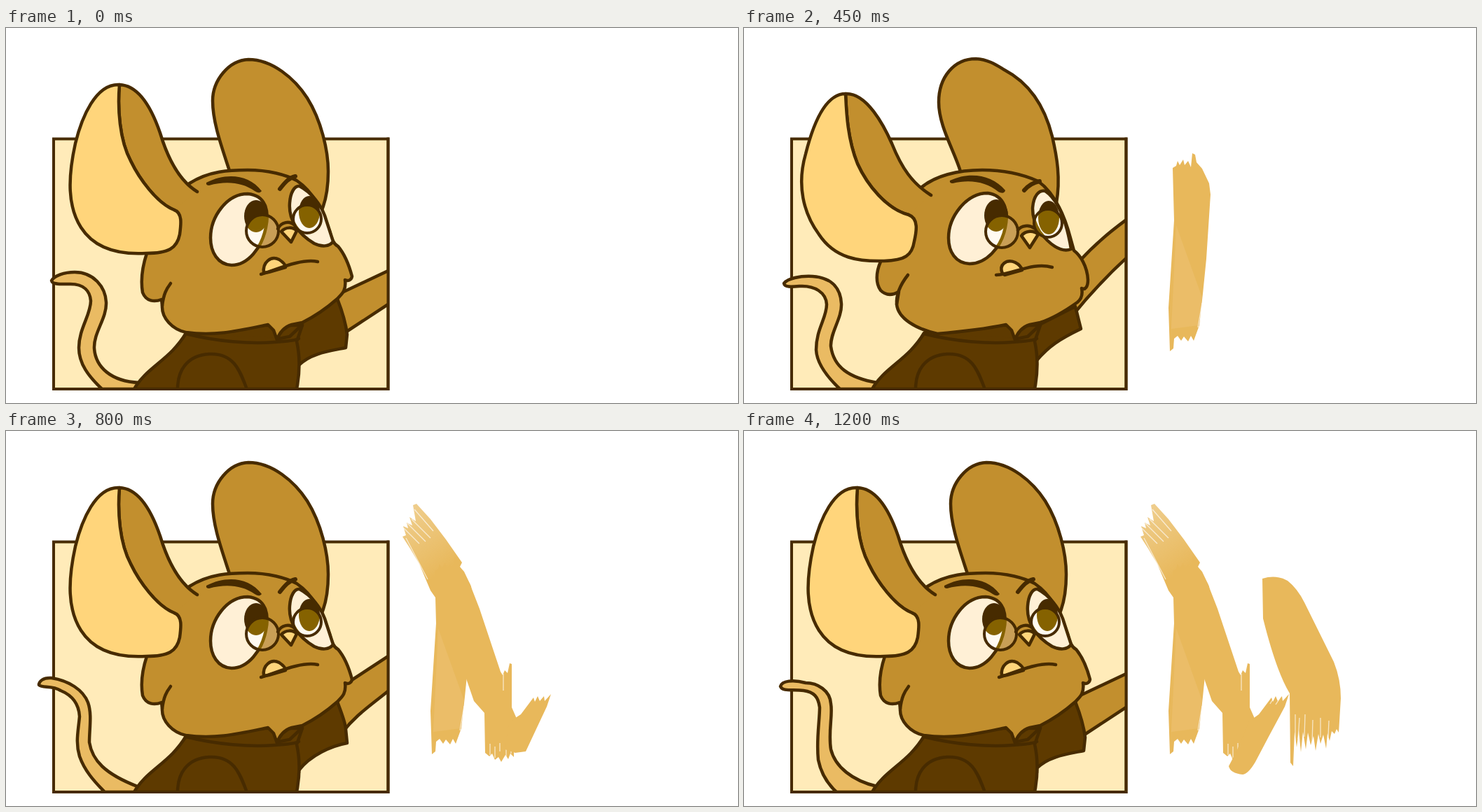
These frames come from a looping animation (1045 by 536 pixels, 1300 ms). An HTML page without scripts:

```html
<!DOCTYPE html>
<html lang="en">
<head>
<meta charset="utf-8">
<title>Painting mouse</title>
<style>
html, body { margin: 0; width: 100%; height: 100%; overflow: hidden; background: #fff; }
svg { display: block; width: 100%; height: 100%; }
.ink { stroke: #472b00; stroke-width: 4.5; stroke-linecap: round; stroke-linejoin: round; fill: none; }
.fur { fill: #c28f2e; }
.light { fill: #ffd57b; }
.cloth { fill: #5e3a00; }
.tail { fill: #eabb63; }
.white { fill: var(--sclera, #fff0d6); }
.dark { fill: var(--pupil, #472b00); stroke: none; }
.glass { --sclera: #fffaf0; --pupil: #856200; stroke: #856200; }
.frame { stroke-width: 4; stroke-linejoin: miter; stroke-linecap: square; }
.paint { fill: #e8b85b; }
.dry { stroke: #fff; stroke-width: 1.3; fill: none; opacity: .65; }
.wash { fill: #edc478; opacity: .45; }

/* Each part is switched on and off in hard steps. */
[class^="on-"] { visibility: hidden; animation: 1.3s step-end infinite; }
.on-calm { animation-name: calm; }
.on-tilt { animation-name: tilt; }
.on-mid { animation-name: mid; }
.on-low { animation-name: low; }
.on-raised { animation-name: raised; }
.on-high { animation-name: high; }
.on-wave { animation-name: wave; }
.on-tail1 { animation-name: tail1; }
.on-tail2 { animation-name: tail2; }
.on-tail3 { animation-name: tail3; }
.on-tail4 { animation-name: tail4; }
.on-150 { animation-name: p150; }
.on-300 { animation-name: p300; }
.on-450 { animation-name: p450; }
.on-600 { animation-name: p600; }
.on-700 { animation-name: p700; }
.on-800 { animation-name: p800; }
.on-950 { animation-name: p950; }
.on-1100 { animation-name: p1100; }
.on-1200 { animation-name: p1200; }
@keyframes calm { 0%, 53.846%, 100% { visibility: visible } 34.615% { visibility: hidden } }
@keyframes tilt { 34.615% { visibility: visible } 0%, 53.846%, 100% { visibility: hidden } }
@keyframes mid { 0%, 53.846%, 92.308%, 100% { visibility: visible } 11.538%, 61.538% { visibility: hidden } }
@keyframes low { 11.538%, 73.077% { visibility: visible } 0%, 23.077%, 84.615%, 100% { visibility: hidden } }
@keyframes raised { 23.077%, 61.538%, 84.615% { visibility: visible } 0%, 34.615%, 73.077%, 92.308%, 100% { visibility: hidden } }
@keyframes high { 34.615% { visibility: visible } 0%, 46.154%, 100% { visibility: hidden } }
@keyframes wave { 46.154% { visibility: visible } 0%, 53.846%, 100% { visibility: hidden } }
@keyframes tail1 { 0% { visibility: visible } 23.077%, 100% { visibility: hidden } }
@keyframes tail2 { 23.077% { visibility: visible } 0%, 46.154%, 100% { visibility: hidden } }
@keyframes tail3 { 46.154%, 84.615%, 100% { visibility: visible } 0%, 61.538% { visibility: hidden } }
@keyframes tail4 { 61.538% { visibility: visible } 0%, 84.615%, 100% { visibility: hidden } }
@keyframes p150 { 11.538% { visibility: visible } 0%, 23.077%, 100% { visibility: hidden } }
@keyframes p300 { 23.077% { visibility: visible } 0%, 34.615%, 100% { visibility: hidden } }
@keyframes p450 { 34.615%, 100% { visibility: visible } 0% { visibility: hidden } }
@keyframes p600 { 46.154%, 100% { visibility: visible } 0% { visibility: hidden } }
@keyframes p700 { 53.846% { visibility: visible } 0%, 61.538%, 100% { visibility: hidden } }
@keyframes p800 { 61.538% { visibility: visible } 0%, 73.077%, 100% { visibility: hidden } }
@keyframes p950 { 73.077%, 100% { visibility: visible } 0% { visibility: hidden } }
@keyframes p1100 { 84.615% { visibility: visible } 0%, 92.308%, 100% { visibility: hidden } }
@keyframes p1200 { 92.308%, 100% { visibility: visible } 0% { visibility: hidden } }
</style>
</head>
<body>
<svg viewBox="0 0 1045 536" preserveAspectRatio="none">
  <defs>
    <clipPath id="panel"><path d="M0 0H545V516H0Z"/></clipPath>
    <clipPath id="calmLens"><circle cx="366" cy="290" r="23"/><circle cx="430" cy="273" r="20"/></clipPath>
    <clipPath id="tiltLens"><circle cx="368" cy="291" r="23"/><circle cx="434" cy="279" r="20"/></clipPath>
    <linearGradient id="fade" gradientUnits="userSpaceOnUse" x1="570" y1="115" x2="625" y2="200">
      <stop stop-color="#e8b85b" stop-opacity=".7"/>
      <stop offset="1" stop-color="#e8b85b"/>
    </linearGradient>
    <g id="calmEyes">
      <path class="white" d="M292 300C292 270 315 237 345 237C371 239 376 262 371 285C365 315 345 339 322 339C302 338 292 320 292 300ZM405 250C406 235 412 225 419 226C436 235 449 252 455 268L467 305C462 313 450 313 440 308C418 295 403 275 405 250Z"/>
      <ellipse class="dark" cx="357" cy="269" rx="17" ry="23"/>
      <ellipse class="dark" cx="433" cy="263" rx="15" ry="23"/>
    </g>
    <g id="tiltEyes">
      <path class="white" d="M292 300C292 270 317 236 348 236C372 239 378 262 373 285C367 315 345 337 322 337C302 336 292 320 292 300ZM412 258C413 240 421 231 430 233C446 244 459 268 467 316C452 322 435 308 422 291C415 280 412 270 412 258Z"/>
      <ellipse class="dark" cx="360" cy="268" rx="17" ry="23"/>
      <ellipse class="dark" cx="435" cy="271" rx="15" ry="24"/>
    </g>
  </defs>

  <g class="ink">
    <path class="frame" d="M68 158.5H545.5V516H68Z" fill="#ffebb9"/>

    <g class="tail" clip-path="url(#panel)">
      <path class="on-tail1" d="M190 507C150 505 128 485 126 458C125 435 144 415 143 392C142 370 125 349 98 349C83 349 69 354 65 361C66 367 78 366 92 366C112 366 120 377 121 390C121 410 104 430 104 457C104 480 118 498 137 516H190"/>
      <path class="on-tail2" d="M190 507C150 500 128 485 124 455C123 435 140 415 139 394C138 375 128 357 98 355C80 354 62 358 57 365C58 371 68 370 80 369C101 368 117 378 118 395C118 415 103 430 103 460C104 480 120 500 137 516H190"/>
      <path class="on-tail3" d="M190 508C155 500 130 480 124 455C120 430 127 405 124 390C123 371 105 360 88 360C70 355 54 357 52 365C55 373 70 369 85 371C100 373 106 380 108 395C108 415 103 440 106 470C110 490 120 505 132 516H190"/>
      <path class="on-tail4" d="M190 509C140 490 123 470 119 445C119 425 123 405 117 388C110 370 90 357 65 353C53 352 47 358 47 363C52 368 65 363 78 371C95 378 104 390 105 408C103 430 99 445 105 465C112 485 125 500 141 516H190"/>
    </g>

    <g clip-path="url(#panel)">
      <g class="on-mid">
        <path class="fur" d="M470 385L482 377L550 345V392L480 438"/>
        <path class="cloth" d="M410 430L473 387C480 405 485 420 487 438L485 457C460 462 435 465 418 482Z"/>
      </g>
      <g class="on-low">
        <path class="fur" d="M470 394C495 383 525 378 550 376V424C525 431 505 440 480 451"/>
        <path class="cloth" d="M410 430L470 395L484 387C488 405 491 420 491 440L488 471C465 470 440 470 418 482Z"/>
      </g>
      <g class="on-raised">
        <path class="fur" d="M470 370L492 357L550 319V368C520 393 500 405 480 431"/>
        <path class="cloth" d="M410 430L473 387C479 403 485 418 485 426L487 446C465 450 435 463 418 485Z"/>
      </g>
      <g class="on-high">
        <path class="fur" d="M465 345L481 331C500 310 525 289 550 271V325C520 352 490 385 468 412"/>
        <path class="cloth" d="M410 430L473 398L481 430C450 445 435 455 418 475Z"/>
      </g>
      <g class="on-wave">
        <path class="fur" d="M475 400L471 316C470 301 482 300 490 307C500 318 508 335 516 342C518 330 521 315 525 313C529 316 535 328 540 325L550 319V369C520 393 500 405 478 430"/>
        <path class="cloth" d="M410 430L478 391C482 405 485 420 487 446C465 450 435 463 418 485Z"/>
        <path d="M477 208C495 225 508 243 516 266M519 278L524 296M467 235L471 240M478 251C490 265 498 285 504 307" stroke-width="4"/>
      </g>
    </g>

    <g class="cloth" clip-path="url(#panel)">
      <path d="M183 516C200 485 235 474 257 436L300 425H423L415 448C420 470 420 490 415 516Z"/>
      <path d="M257 437C300 448 350 452 383 449C400 448 412 447 418 444M423 424L405 441L390 444"/>
      <path d="M245 516C245 490 258 468 290 466C325 464 334 490 343 514"/>
    </g>
    <path class="frame" d="M545.5 158.5V516H68"/>

    <g class="on-calm">
      <path class="fur" d="M319 204C308 170 295 135 295 104C295 75 318 46 346 45C380 45 412 72 430 100C450 132 460 175 460 205C460 225 457 245 451 260"/>
      <path class="fur" d="M262 222C290 204 320 203 345 203C375 203 400 210 415 218C440 235 452 262 462 290C465 305 470 310 474 312C485 325 490 340 494 355C493 361 488 362 484 360C486 375 480 380 473 387C455 403 435 415 423 421L408 424C396 428 390 436 387 446L382 432L374 424C335 432 300 441 257 435C238 431 222 415 223 397L222 388C212 392 200 391 195 378C192 360 195 340 201 322"/>
      <path d="M235 365C229 373 225 380 223 397"/>
      <path class="fur" d="M273 234C250 220 232 190 220 150C208 115 190 82 162 81C159 115 162 160 178 190C190 215 215 250 240 260"/>
      <path class="light" d="M162 81C128 79 108 128 99 165C88 215 88 255 107 285C128 318 165 324 200 322C232 322 244 315 248 295C250 280 252 264 240 260C215 250 190 215 178 190C162 160 159 115 162 81Z"/>
      <use href="#calmEyes"/>
      <g class="glass" clip-path="url(#calmLens)"><path d="M340 250H460V320H340Z" fill="#c99f56"/><use href="#calmEyes"/></g>
      <g stroke-width="4"><circle cx="366" cy="290" r="23"/><circle cx="430" cy="273" r="20"/></g>
      <path class="light" d="M393 291C399 284 410 284 415 290L407 306Z"/>
      <path d="M388 287C393 277 405 275 412 282"/>
      <path class="dark" d="M286 221C313 207 346 208 365 233C362 237 358 235 355 233C338 221 315 218 290 225Q285 225 286 221Z"/>
      <path d="M391 230C398 221 404 214 413 212" stroke-width="6"/>
      <path class="light" d="M368 350C366 335 378 325 390 331C396 335 399 339 399 342L375 349Z"/>
      <path d="M364 352C385 346 420 329 445 334"/>
    </g>

    <g class="on-tilt">
      <path class="fur" d="M309 205C300 175 278 140 278 106C278 70 300 44 331 44C350 45 362 54 372 60C410 80 430 115 440 155C447 185 452 215 446 250"/>
      <path class="fur" d="M252 229C272 211 306 203 340 203C375 203 400 210 420 219C442 235 456 262 466 300L471 318C480 325 490 340 491 360C491 370 487 375 482 372C484 382 481 388 476 392C455 407 438 416 423 421L408 424C396 428 390 436 387 446L382 432L374 424C335 432 300 435 276 437C245 430 220 415 218 395L221 377C212 382 203 383 195 375C188 365 188 350 195 334"/>
      <path d="M234 353C223 367 217 380 218 395"/>
      <path class="fur" d="M267 239C240 222 225 200 211 165C200 140 175 92 145 94C146 115 147 157 162 194C176 225 204 259 235 267"/>
      <path class="light" d="M145 94C115 94 98 140 88 180C75 225 85 265 107 295C130 330 165 334 200 333C230 332 240 325 243 305C246 292 250 272 235 267C204 259 176 225 162 194C147 157 146 115 145 94Z"/>
      <use href="#tiltEyes"/>
      <g class="glass" clip-path="url(#tiltLens)"><path d="M340 250H460V320H340Z" fill="#c99f56"/><use href="#tiltEyes"/></g>
      <g stroke-width="4"><circle cx="368" cy="291" r="23"/><circle cx="434" cy="279" r="20"/></g>
      <path class="light" d="M396 297C402 289 414 289 420 295L408 314Z"/>
      <path d="M391 289C396 282 407 281 414 286"/>
      <path class="dark" d="M294 218C321 205 354 209 373 232C372 237 367 236 363 234C346 220 323 216 298 222Q293 222 294 218Z"/>
      <path d="M400 232C406 225 412 221 422 219" stroke-width="6"/>
      <path class="light" d="M369 351C363 338 375 330 387 335C393 338 396 342 397 346L372 353Z"/>
      <path d="M360 353C385 352 412 334 440 342"/>
    </g>
  </g>

  <g class="paint">
    <path class="on-150" d="M606 400L611 388L613 398L617 382L621 396L626 380L631 393L636 379L641 390L647 376L650 386L655 374L652 408L642 447L638 440L634 448L628 441L624 447L619 440L614 444L613 458L608 462Z"/>
    <g class="on-300">
      <path d="M612 308L616 304L618 320L622 318L623 292L626 316L629 288L631 318L635 302L638 322L642 305L645 321L649 302L653 307L656 289L663 277L660 330L655 380L650 425L642 447L638 440L634 448L628 441L624 447L619 440L614 444L613 458L608 462L606 400Z"/>
      <path class="dry" d="M622 290V322M637 300L639 320M648 297L646 316M654 393L648 428"/>
    </g>
    <g class="on-450">
      <path d="M612 200L617 197L619 190L622 196L627 188L629 196L634 190L638 199L640 179L644 181L646 192L654 201L664 222L666 238L660 330L655 380L650 425L642 447L638 440L634 448L628 441L624 447L619 440L614 444L613 458L608 462L606 400L614 275Z"/>
      <path class="wash" d="M617 282L654 385L649 425L610 430Z"/>
      <path class="dry" d="M654 393L648 428"/>
    </g>
    <g class="on-600">
      <path fill="url(#fade)" d="M566 151L571 149L567 136L574 139L572 131L580 135L576 123L585 129L581 106L586 104L606 126L628 155L651 188L648 194L662 218L676 254L691 299L706 344L709 349L712 342L716 346L719 332L722 333V395L729 411L725 426V466L720 461L717 469L713 463L707 473L703 466L698 470L694 461L690 465L684 460L683 403L668 386L657 354L640 300L613 238L606 228L590 190L577 168Z"/>
      <path class="dry" d="M568 139L590 161M573 132L599 158M579 126L606 153M583 112L610 143M571 153L602 212M691 447V463M698 451V467M705 446V458M714 450V466M721 448V461M710 347V371"/>
    </g>
    <path class="on-700" d="M718 406L725 404L730 409L731 402L736 409L741 403L744 408L750 402L753 406L760 401L759 409L742 458L732 455L727 460L715 455Z"/>
    <path class="on-800" d="M718 416L735 405L753 381L755 387L759 379L762 386L768 379L769 386L778 376L772 394L742 458L727 460L712 455Z"/>
    <g class="on-950">
      <path d="M692 479L703 458L721 415L735 405L753 381L755 387L759 379L762 386L768 379L769 386L778 376L772 394L750 435L730 473Q720 490 712 491Q694 489 692 479Z"/>
      <path class="dry" d="M756 382L751 390M765 382L759 391"/>
    </g>
    <path class="on-1100" d="M740 211Q760 205 776 214Q790 225 800 245L831 309L827 319L823 312L819 328L813 317L809 331L803 321L797 336L792 325L786 340L779 330L774 344L768 339Q751 304 741 268Z"/>
    <g class="on-1200">
      <path d="M740 211Q760 205 776 214Q790 225 800 245L842 330Q852 355 852 382L849 431L846 426L843 433L839 429L836 443L833 432L831 454L827 434L823 447L820 433L816 457L813 436L809 449L805 431L802 455L798 430L795 459L792 428L789 452L786 430L784 479L780 474L779 375Q760 344 741 268Z"/>
      <path class="dry" d="M787 405V445M793 410L791 440M801 405L800 437M812 413L811 447M823 410V438M835 414L834 437"/>
    </g>
  </g>
</svg>
</body>
</html>
```
